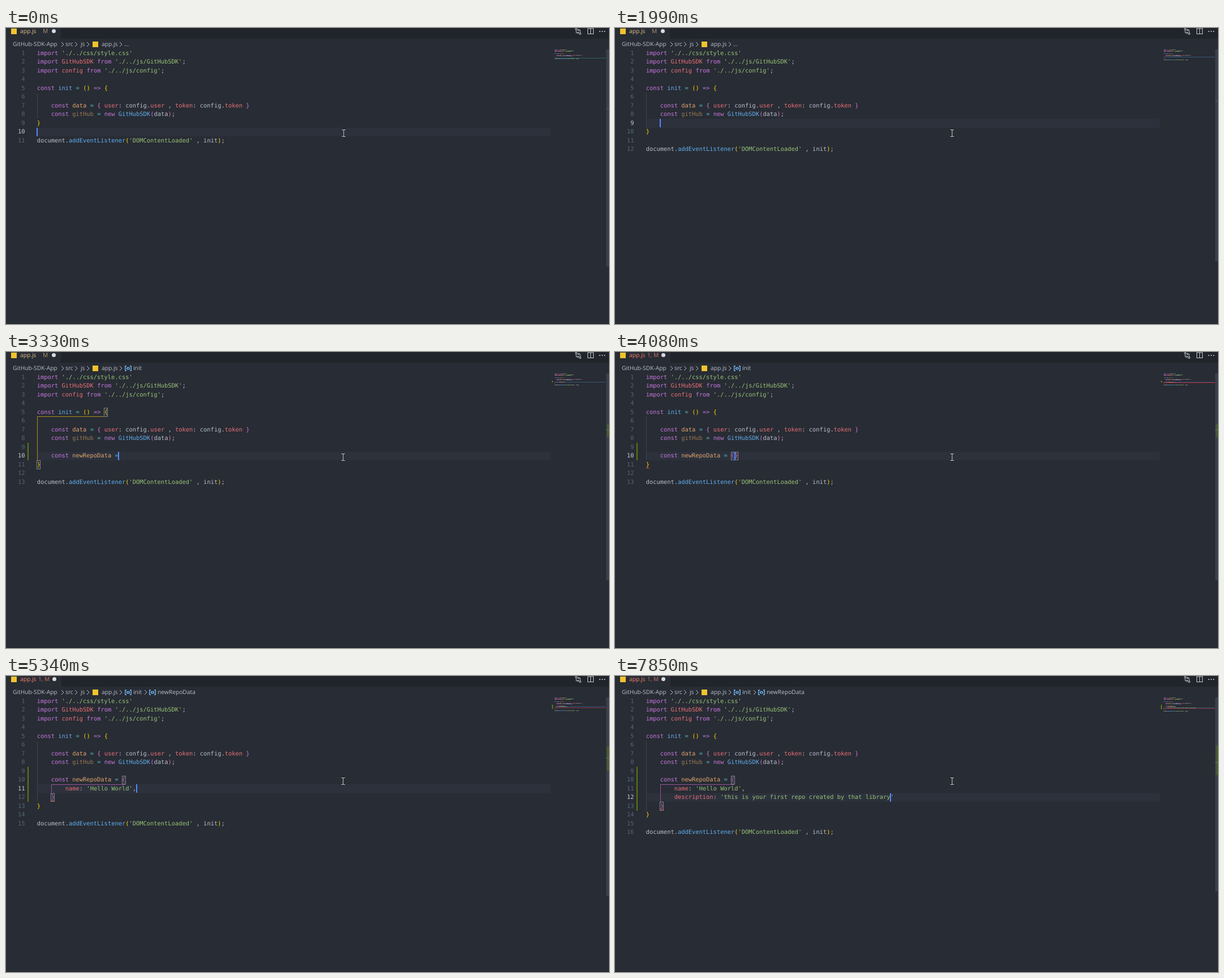
An HTML page that plays this animation: 1066x525 px, repeating every 8000 ms.

```html
<!DOCTYPE html>
<html lang="en">
<head>
<meta charset="utf-8">
<title>Typing in a code editor</title>
<style>
  html, body { margin: 0; width: 100%; height: 100%; overflow: hidden; background: #282c34; }
  #stage { position: relative; width: 1066px; height: 525px; overflow: hidden; background: #282c34; text-rendering: geometricPrecision; }
  #stage div, #stage span, #stage svg { position: absolute; white-space: pre; }
  svg { left: 0; top: 0; }
  .ui { font: 10.25px/16px "Open Sans", "Noto Sans", sans-serif; color: #b9bfca; }
  .code { font: 10.4px/15.47px "DejaVu Sans Mono", "Noto Sans Mono", monospace; }
  #text { left: 54.7px; top: 38px; }
  #mini { left: 969.5px; top: 38px; transform-origin: 0 0; transform: scale(.13, .105); -webkit-text-stroke: 1.2px; }
  .num { left: 0; width: 33.5px; text-align: right; color: #50687a; }
  .num.on { color: #c5cad3; }
  .pair { box-sizing: border-box; width: 7px; height: 15.5px; border: 1px solid #82868e; }
  .p { color: #c678dd } .g { color: #98c379 } .r { color: #e86f78 } .w { color: #b8bfcb }
  .b { color: #61afef } .c { color: #56b6c2 } .y { color: #ffd700 } .m { color: #da70d6 }
  .o { color: #dea26b } .d { color: #967855 }
</style>
</head>
<body>
<div id="stage">
  <div style="left:0;top:0;width:1066px;height:19px;background:#21252b"></div>
  <div id="tab" style="left:0;top:0;height:19px;background:#282c34"></div>
  <div style="left:0;top:524px;width:1066px;height:1px;background:#21252b"></div>
  <div id="under"></div>
  <div id="text" class="code"></div>
  <div id="over"></div>
  <div id="mini" class="code"></div>
  <div id="head"></div>
  <svg width="1066" height="40" fill="none" stroke="#c5c9d0">
    <rect x="1028.5" y="1" width="10" height="9.5"/>
    <path d="M1033.5 1V10.5"/>
    <circle cx="1008" cy="2" r="1.5"/>
    <circle cx="1015" cy="10" r="1.5"/>
    <path d="M1008 3.5V8.5H1012M1010.5 6.5L1012.5 8.5L1010.5 10.5M1015 8.5V3.5H1011M1012.8 1.5L1010.8 3.5L1012.8 5.5"/>
    <g fill="#c5c9d0" stroke="none">
      <circle cx="1049.7" cy="6" r="1.1"/><circle cx="1054" cy="6" r="1.1"/><circle cx="1058.3" cy="6" r="1.1"/>
    </g>
  </svg>
  <svg id="mouse" width="10" height="15" style="top:179px" fill="none">
    <path d="M2 1.5H4.2L5 2.2L5.8 1.5H8M5 2V13M2 13.5H4.2L5 12.8L5.8 13.5H8" stroke="#15171b" stroke-width="2.4"/>
    <path d="M2 1.5H4.2L5 2.2L5.8 1.5H8M5 2V13M2 13.5H4.2L5 12.8L5.8 13.5H8" stroke="#e8eaee"/>
  </svg>
</div>
<script>
const $ = id => document.getElementById(id);
const CH = 6.265, ROW = 15.47, TOP = 37.6, LEFT = 54.7, VIEW = 503;
const X = col => LEFT + CH * col;
const Y = row => TOP + ROW * (row - 1);
const miniY = row => 38 + 1.63 * (row - 1);

// Code lines: "~" separates tokens, the first letter of each is its colour class.
const INTRO = [
  "pimport ~g'./../css/style.css'",
  "pimport ~rGitHubSDK ~pfrom ~g'./../js/GitHubSDK'~w;",
  "pimport ~rconfig ~pfrom ~g'./../js/config'~w;",
  "",
  "pconst ~binit ~c= ~y() ~p=> ~y{",
  "",
  "p    const ~odata ~c= ~m{ ~ruser~w: config.~ruser ~w, ~rtoken~w: config.~rtoken ~m}",
  "p    const ~dgitHub ~c= ~pnew ~bGitHubSDK~m(~wdata~m)~w;"
];
const OUTRO = ["y}", "", "wdocument.~baddEventListener~y(~g'DOMContentLoaded' ~w, init~y)~w;"];
const DECL = "p    const ~onewRepoData ~c= ~m{";
const NAME = "r        name~w: ~g'Hello World'~w,";
const DESC = "r        description~w: ~g'this is your first repo created by that library'";
const CLOSE = "m    }";

// First n characters of a marked line.
function cut(line, n) {
  const out = [];
  for (const tok of line.split("~")) {
    if (n <= 0) break;
    out.push(tok[0] + tok.slice(1, n + 1));
    n -= tok.length - 1;
  }
  return out.join("~");
}

const steps = [];
let state = { row: 10, col: 0, body: [], caret: 1, mouse: 596, crumbs: 0, green: 0, err: 0, pair: null, wave: null };
const at = (time, change) => steps.push([time, state = { ...state, ...change }]);
const outer = row => [[5, 19], [row, 0]];
const inner = row => [[10, 24], [row, 4]];
const decl = (time, n, more) => at(time, { body: ["", cut(DECL, n)], col: n, ...more });
const name = (time, n, end = "", more) => at(time, { body: ["", DECL, cut(NAME, n) + end, CLOSE], col: n, ...more });
const desc = (time, n, end = "", more) => at(time, { body: ["", DECL, NAME, cut(DESC, n) + end, CLOSE], col: n, ...more });

at(0, {});
at(370, { mouse: 595 });
at(490, { caret: 0 });
at(990, { caret: 1 });
at(1490, { caret: 0 });
at(1990, { caret: 1, body: [""], row: 9, col: 4 });
at(2060, { pair: outer(10) });
decl(2240, 4, { row: 10, pair: outer(11) });
at(2310, { crumbs: 1, green: 1 });
decl(2490, 7);
decl(2620, 9);
at(2740, { green: 2 });
decl(3010, 13);
decl(3080, 21);
decl(3260, 22);
decl(3330, 23);
decl(3510, 24);
at(3900, { body: ["", DECL + "}"], col: 25, pair: null });
at(3970, { pair: [[10, 24], [10, 25]] });
at(4080, { err: 1, wave: [11, 0] });
name(4150, 8, "", { row: 11, pair: null, wave: null });
at(4220, { pair: inner(12), wave: [12, 4] });
name(4330, 10);
name(4400, 12);
at(4520, { crumbs: 2, green: 4 });
name(4590, 13);
name(4770, 15, "'");
name(4840, 20, "~g'");
name(5090, 26, "~g'");
name(5340, 28);
desc(5590, 8, "", { row: 12, pair: inner(13), wave: [13, 4], green: 5 });
desc(5770, 19);
desc(5840, 20);
[[6020, 26], [6270, 29], [6540, 34], [6720, 40], [6970, 45], [7220, 53], [7400, 56], [7650, 61], [7850, 69]]
  .forEach(([time, n]) => desc(time, n, "~g'"));

const box = (x, y, w, h, color, more = "") =>
  `<div style="left:${x}px;top:${y}px;width:${w}px;height:${h}px;background:${color};${more}"></div>`;
const label = (x, y, text, more = "") => `<span class="ui" style="left:${x}px;top:${y}px;${more}">${text}</span>`;

function codeLine(line, i) {
  let col = 0;
  return line.split("~").filter(Boolean).map(tok => {
    const html = `<span class="${tok[0]}" style="left:${col * CH}px;top:${i * ROW}px">${tok.slice(1)}</span>`;
    col += tok.length - 1;
    return html;
  }).join("");
}

function header(s) {
  const chevron = x => `<path d="M${x - 2} 25L${x + 2} 29L${x - 2} 33" stroke="#b9bfca"/>`;
  const symbol = x => `<g stroke="#75beff" stroke-width="1.3">
    <path d="M${x + 3} 25H${x + .8}V33H${x + 3}M${x + 9} 25H${x + 11.2}V33H${x + 9}"/>
    <ellipse cx="${x + 6}" cy="29" rx="2.4" ry="1.7"/></g>`;
  const tint = s.err ? "color:#f88070;" : "color:#e2c08d;";
  let html = box(9, 1, 10, 10, "#f0c32e") + box(153, 24, 10, 10, "#f0c32e")
    + label(25, -2, "app.js", tint)
    + (s.err ? label(57, -2, "1, M", tint + "opacity:.8") : label(65, -2, "M", tint + "opacity:.7"))
    + box(s.err ? 82 : 81.3, 2.3, 7, 7, "#d7dae0", "border-radius:50%")
    + label(12, 21, "GitHub-SDK-App") + label(105, 21, "src") + label(132, 21, "js") + label(169, 21, "app.js");
  let marks = [100, 124, 145, 203].map(chevron).join("");
  if (s.crumbs) {
    html += label(225, 21, "init");
    marks += symbol(210);
  } else html += label(209, 21, "...");
  if (s.crumbs > 1) {
    html += label(268, 21, "newRepoData");
    marks += chevron(247) + symbol(253);
  }
  return html + `<svg width="400" height="40" fill="none">${marks}</svg>`;
}

function draw(s) {
  const lines = [...INTRO, ...s.body, ...OUTRO];
  const count = lines.length, end = 9 + s.body.length;
  const scale = VIEW / (VIEW + (count - 1) * ROW);
  const ruler = row => 38 + (row - 1) * ROW * scale;

  // Current line, indent guides, gutter and scrollbar.
  let under = box(55, Y(s.row), 908, ROW, "#2c313c");
  const [open, shut] = s.pair || [[0, 0], [0, 0]];
  const spans = shut[0] > open[0];
  const yellow = spans && shut[1] === 0;
  under += box(54.5, Y(6), 1, Y(end) - Y(6), yellow ? "#a8921c" : "#3e444e");
  if (yellow) under += box(55, Y(6) - .8, X(20) - 55, 1, "#a8921c");
  else if (spans) under += box(79.6, Y(11), 1, Y(shut[0]) - Y(11), "#94559a")
    + box(80, Y(11) - .8, X(25) - 80, 1, "#94559a");
  lines.forEach((_, i) => {
    under += `<div class="code num${i + 1 === s.row ? " on" : ""}" style="top:${Y(i + 1) + .4}px">${i + 1}</div>`;
  });
  under += box(1061, 38, 5, VIEW * scale, "#3a404a");
  if (s.green) under += box(37.8, Y(9), 2, s.green * ROW, "#587c0c")
    + box(965, miniY(9), 1.5, s.green * 1.63, "#587c0c")
    + box(1062, ruler(9), 4, s.green * ROW * scale, "#475931");
  under += box(1061, ruler(s.row) - 1.5, 5, 1, s.green ? "#4a7f88" : "#56606c");
  under += box(970, miniY(s.row), 90, 1, s.body.length ? "#34557c" : "#2b616b");
  if (s.wave) under += box(970, miniY(s.wave[0]) - .3, 91, 1, s.row === 10 ? "#b3272c" : "#86303a");

  // Bracket boxes, error squiggle and caret.
  let over = "";
  if (s.pair) for (const [r, c] of s.pair) over += `<div class="pair" style="left:${X(c) - .3}px;top:${Y(r)}px"></div>`;
  if (s.wave) {
    const x = X(s.wave[1]), y = Y(s.wave[0]) + 13;
    over += `<svg width="200" height="300" fill="none"><path d="M${x} ${y + 1.5}l1.5 -1.5l1.5 1.5l1.5 -1.5l1.5 1.5" stroke="#e5534b"/></svg>`;
  }
  if (s.caret) over += box(Math.floor(X(s.col)), Y(s.row), 2, 15, "#528bff");

  const code = lines.map(codeLine).join("");
  $("under").innerHTML = under;
  $("text").innerHTML = code;
  $("mini").innerHTML = code;
  $("over").innerHTML = over;
  $("head").innerHTML = header(s);
  $("tab").style.width = (s.err ? 97.5 : 96.5) + "px";
  $("mouse").style.left = s.mouse - 4.5 + "px";
}

const start = performance.now();
let shown = null;
function tick() {
  const time = (performance.now() - start) % 8000;
  const now = steps.filter(step => step[0] <= time).pop()[1];
  if (now !== shown) draw(shown = now);
  requestAnimationFrame(tick);
}
tick();
</script>
</body>
</html>
```
